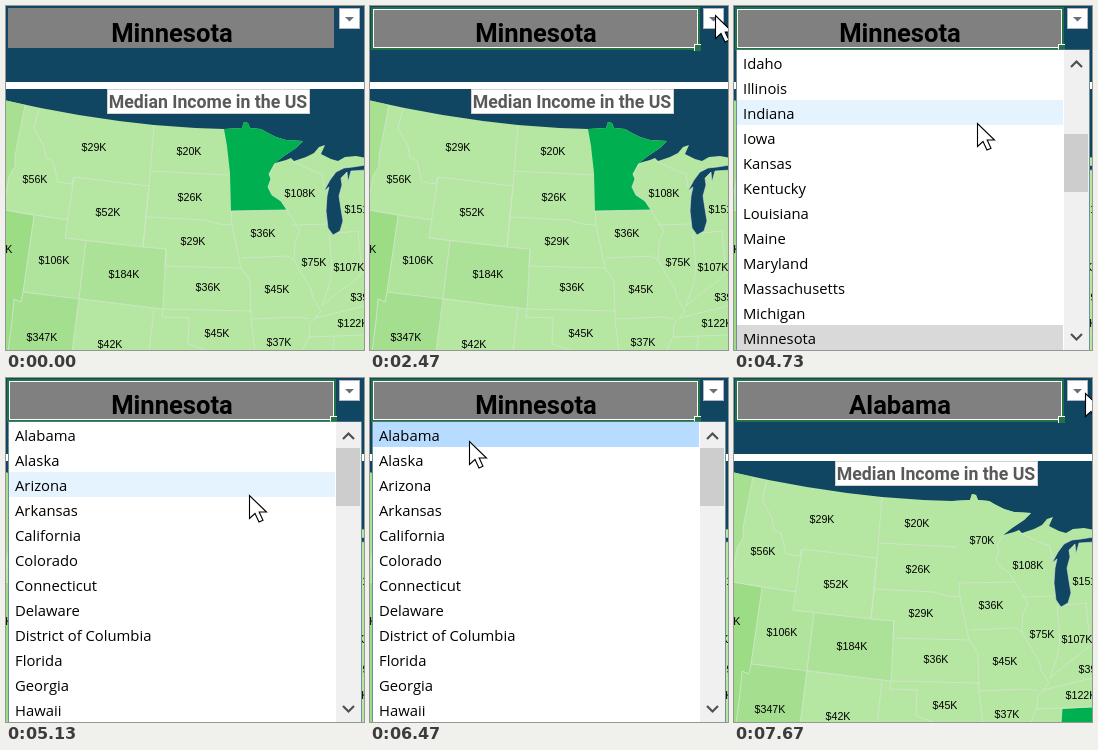
Animation, 358 px wide and 344 px high, one loop 8000 ms. Source, as an HTML page:

```html
<!DOCTYPE html>
<html lang="en">
<head>
<meta charset="utf-8">
<title>State income map</title>
<style>
html, body { margin: 0; width: 100%; height: 100%; overflow: hidden; background: #104661; }
svg { display: block; width: 358px; height: 344px; }
.head { font: 700 25.6px Roboto, sans-serif; text-anchor: middle; }
.title { font: 700 17.7px Roboto, sans-serif; text-anchor: middle; fill: #595959; }
#labels text { font: 10.67px "Liberation Sans", Arial, sans-serif; text-anchor: middle; }
#rows text { font: 14.8px "Open Sans", sans-serif; }
#borders { fill: none; stroke: #d3e6d0; stroke-width: .8; stroke-linejoin: round; }
.chevron { fill: none; stroke: #505050; stroke-width: 2.2; }
</style>
</head>
<body>
<svg viewBox="0 0 358 344">
  <rect width="358" height="344" fill="#104661"/>
  <rect y="76" width="358" height="7" fill="#fff"/>

  <g id="map">
    <path fill="#b5e6a2" d="M-2 94Q70 111 148 119Q182 122 218 123L236 122 238 116 242 117 244 122 255 123 262 127 270 131 280 134 297 135 290 142 278 150 269 157 280 154 285 152 288 155 300 151 308 147 313 141 319 139 315 148 325 153 332 155 339 151 350 150 360 152V346H-2Z"/>
    <path fill="#a6e090" d="M-2 94L19 99 9 150 9 160 3 170-2 200Z"/>
    <path fill="#9bdc84" d="M-2 204L28 210 17 286 15 296 8 293 6 315 2 346H-2Z"/>
    <path fill="#b0e49d" d="M28 210L62 214 59 232 80 235 73 292 17 286Z"/>
    <path fill="#abe297" d="M80 235L160 243 157 303 73 292Z"/>
    <path fill="#a4df8f" d="M17 286L73 292 66 346H2L6 315 8 293 15 296Z"/>
    <path id="minnesota" d="M218 123L236 122 238 116 242 117 244 122 255 123 262 127 270 131 280 134 297 135 290 142 278 150 268 158 263 168 265 173 262 181 266 189 275 195 281 204 225 205 224 167 221 140Z"/>
    <path id="alabama" d="M328 331L360 329V346H327Z"/>
    <g id="borders">
      <path d="M19 99L9 150 9 160 3 170-2 200M33 102L28 122 38 140 40 152 47 155 52 176 66 178 68 171 143 180 148 119M68 171L59 232 137 241 143 180M-2 204L62 214M28 210L17 286 15 296 8 293 6 315 2 346"/>
      <path d="M80 235L73 292 66 346M17 286L157 303 160 243 137 241M144 165L223 169M143 180L140 211 137 241M140 211L200 214 212 218 226 219"/>
      <path d="M160 243L159 260 235 262 226 219 225 205M235 262L244 275 245 313 249 346M157 303L246 305M157 303L156 311 183 312 182 338 200 344M148 303L143 346"/>
      <path d="M225 205L281 204 287 214 294 225 289 236 288 254 297 270 305 283 307 292 315 305 309 312 304 318 303 330 296 346M236 252L282 250 288 254M245 313L293 311 304 313"/>
      <path d="M287 219L320 218M323 228L326 262 323 280 316 300 330 288 345 277 358 266M332 227L352 225 356 266M309 312L358 300M303 331L358 329M328 331L327 346"/>
      <path d="M269 158L263 168 265 173 262 181 266 189 275 195 281 204M286 155L305 164 316 168 318 181"/>
    </g>
    <path fill="#104661" stroke="#d7e5e2" stroke-width=".6" d="M360 159L347 161 338 162 330 166 324 174 318 185 323 181 321 190 320 205 322 222 327 229 334 225 337 215 335 203 333 190 336 179 335 172 341 166 342 176 345 165 360 164Z"/>
    <g id="labels"></g>
  </g>

  <rect x="101.5" y="83.5" width="202" height="24" fill="#fff" stroke="#d0d0d0"/>
  <text class="title" x="202" y="102">Median Income in the US</text>

  <rect x="2" y="2" width="326" height="40" fill="#808080"/>
  <text class="head" id="state" x="166" y="35.5"></text>
  <g id="selection">
    <rect x="3.5" y="3.5" width="324" height="38" fill="none" stroke="#fff"/>
    <rect x="2" y="2" width="327" height="41" fill="none" stroke="#217346" stroke-width="2"/>
    <path fill="#fff" d="M324 38h7v7h-7z"/>
    <path fill="#217346" d="M325 39h6v6h-6z"/>
  </g>
  <rect x="333.5" y="2.5" width="20" height="20" fill="#fff" stroke="#b4b4be"/>
  <path fill="#6e6e78" d="M339 11h9l-4.500 4.500z"/>

  <g id="list">
    <rect x="2" y="43.500" width="354" height="302" fill="#6f8f94"/>
    <rect x="3" y="44" width="327" height="300" fill="#fff"/>
    <rect x="330" y="44" width="25" height="300" fill="#f0f0f0"/>
    <rect id="thumb" x="330" width="24" height="58" fill="#cdcdcd"/>
    <path class="chevron" d="M337 61l5.500-5.500 5.500 5.500M337 328l5.500 5.500 5.500-5.500"/>
    <g id="rows"></g>
  </g>
  <path id="cursor" fill="#fff" stroke="#000" stroke-width="1.100" d="M.5.5V23.500L6 18.500 10 27 14 25.200 10.200 17H17.500Z"/>
</svg>
<script>
const $ = id => document.getElementById(id);
const FRAMES = 120, FPS = 15, ROWS = 12, ROW_H = 25, LIST_TOP = 44;
const states = ("Alabama,Alaska,Arizona,Arkansas,California,Colorado,Connecticut,Delaware," +
  "District of Columbia,Florida,Georgia,Hawaii,Idaho,Illinois,Indiana,Iowa,Kansas,Kentucky," +
  "Louisiana,Maine,Maryland,Massachusetts,Michigan,Minnesota").split(",");

// value in thousands, centre x, centre y
const incomes = [
  [29, 88, 141], [20, 183, 145], [56, 29, 173], [26, 184, 191], [52, 102, 206], [108, 294, 187],
  [151, 354, 203], [36, 257, 227], [29, 187, 235], [194, -9, 243], [106, 48, 254], [184, 118, 268],
  [75, 308, 256], [107, 343, 261], [36, 202, 281], [45, 271, 283], [39, 357, 291], [122, 347, 317],
  [347, 36, 331], [42, 104, 338], [45, 211, 327], [37, 273, 336], [70, 248, 162]
];

// step, x, y of the pointer tip
const path = [
  [6, 318, 360], [7, 320, 320], [9, 323, 205], [11, 336, 70], [13, 351, 8], [19, 351, 8],
  [20, 350, 8], [26, 350, 8], [29, 346, 9], [30, 346, 9], [31, 345, 9], [68, 345, 9],
  [69, 302, 54], [70, 259, 101], [71, 243, 117], [87, 243, 117], [88, 154, 84], [90, 115, 69],
  [92, 99, 63], [105, 99, 63], [106, 165, 46], [107, 245, 28], [109, 345, 9], [111, 345, 9], [115, 351, 15]
];

function add(parent, tag, attrs, text = "") {
  const el = document.createElementNS("http://www.w3.org/2000/svg", tag);
  for (const k in attrs) el.setAttribute(k, attrs[k]);
  el.textContent = text;
  return parent.appendChild(el);
}

const labels = incomes.map(([v, x, y]) => add($("labels"), "text", { x, y: y + 4 }, `$${v}K`));
const rows = Array.from({ length: ROWS }, (_, i) => {
  const y = LIST_TOP + i * ROW_H;
  return {
    back: add($("rows"), "rect", { x: 3, y, width: 326, height: ROW_H }),
    text: add($("rows"), "text", { x: 9, y: y + 19 })
  };
});

function pointer(n) {
  const i = path.findIndex(p => p[0] >= n);
  if (i < 1) return path[i ? path.length - 1 : 0].slice(1);
  const [a, ax, ay] = path[i - 1], [b, bx, by] = path[i], k = (n - a) / (b - a);
  return [ax + (bx - ax) * k, ay + (by - ay) * k];
}

const show = (el, on) => el.setAttribute("visibility", on ? "visible" : "hidden");

function draw(n) {
  const [x, y] = pointer(n);
  const updated = n >= 106;
  $("cursor").setAttribute("transform", `translate(${Math.round(x)} ${Math.round(y)})`);
  $("state").textContent = n < 101 ? "Minnesota" : "Alabama";
  $("minnesota").setAttribute("fill", updated ? "#b5e6a2" : "#00b050");
  $("alabama").setAttribute("fill", updated ? "#00b050" : "#b5e6a2");
  show(labels.at(-1), updated);
  show($("selection"), n >= 37);

  const open = n >= 60 && n < 101;
  $("list").style.display = open ? "" : "none";
  if (!open) return;
  const top = n < 76 ? 12 : n < 77 ? 6 : 0;
  const hover = x < 330 ? Math.floor((y - LIST_TOP) / ROW_H) : -1;
  $("thumb").setAttribute("y", 70 + top * 58 / 12);
  rows.forEach(({ back, text }, i) => {
    const name = states[top + i];
    text.textContent = name;
    back.setAttribute("fill", i === hover ? (n >= 97 ? "#b8dcff" : "#e5f3ff")
      : name === "Minnesota" ? "#d9d9d9" : "#fff");
  });
}

const start = performance.now();
function tick() {
  const t = (performance.now() - start) / 1000;
  draw(Math.floor(t * FPS + .06) % FRAMES);
  requestAnimationFrame(tick);
}
tick();
</script>
</body>
</html>
```
